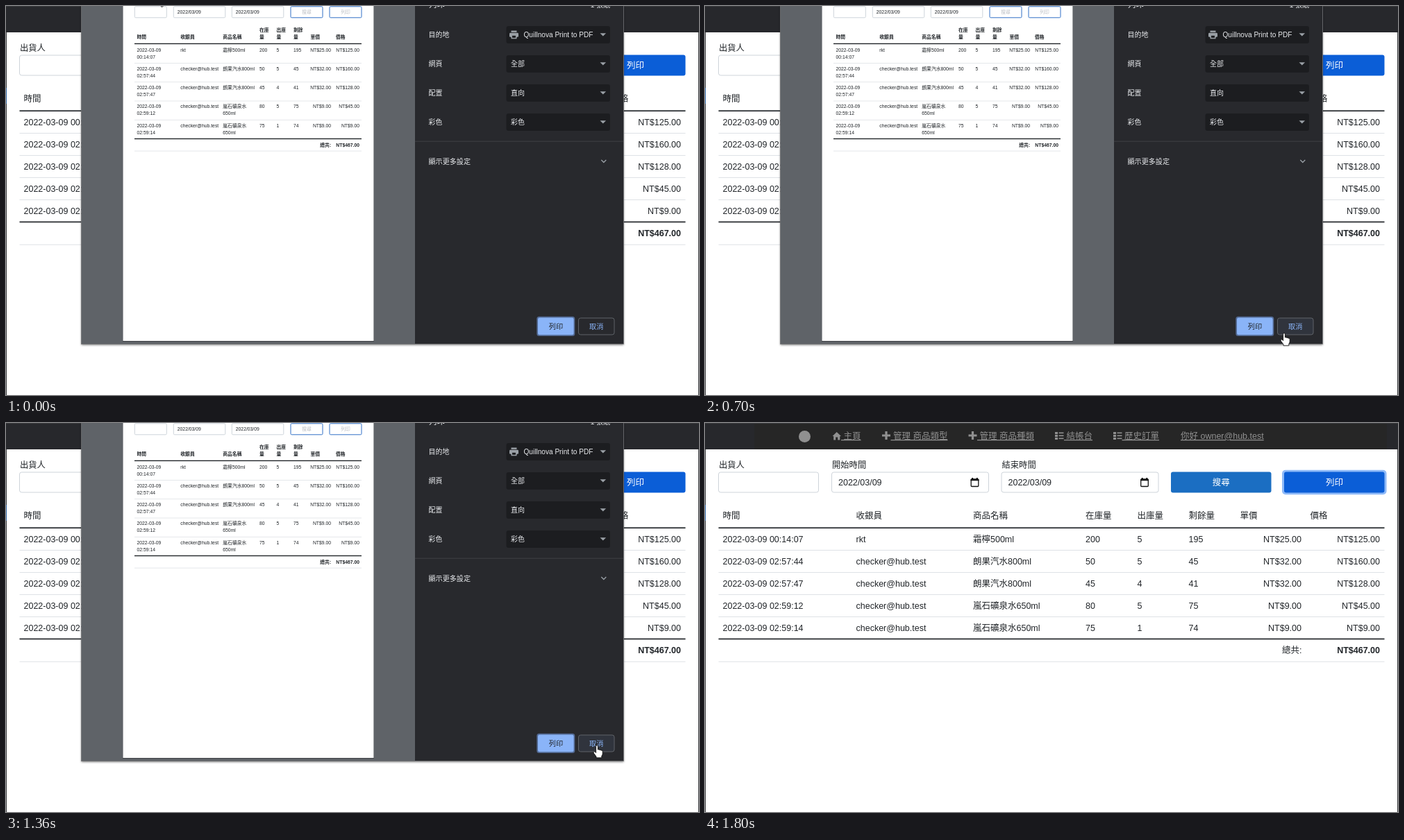
Recreate the animation shown at these times as an HTML page. Size 998 by 561 pixels, loop 2.22 s.

```html
<!DOCTYPE html>
<html lang="zh-Hant">
<head>
<meta charset="utf-8">
<title>列印</title>
<style>
html, body { margin: 0; width: 100%; height: 100%; overflow: hidden; background: #fff; }
svg { display: block; width: 100%; height: 100%; }
text { font-family: "Liberation Sans", "Noto Sans CJK TC", "Noto Sans CJK", sans-serif; white-space: pre; }
</style>
</head>
<body>
<svg id="stage" viewBox="0 0 998 561">
  <defs>
    <filter id="soft" x="-5%" y="-5%" width="110%" height="110%"><feGaussianBlur stdDeviation="1.6"/></filter>
    <clipPath id="sheet"><rect x="109" y="0" width="780" height="487"/></clipPath>
  </defs>
  <g id="page"></g>
  <g id="fade">
    <path d="M109 0H889L925.5 521H72Z" fill="#28292d" opacity=".16"/>
    <path d="M72 521.5H925.5" stroke="#000" stroke-opacity=".08"/>
  </g>
  <g id="dialog">
    <rect x="108.5" y="-6" width="781" height="495" fill="#000" opacity=".5" filter="url(#soft)"/>
    <rect x="108.5" y="-6" width="781" height="493.5" fill="#28292d" stroke="#77787b" stroke-width=".8"/>
    <g id="preview" clip-path="url(#sheet)"></g>
  </g>
  <g id="cursor">
    <path id="arrow" d="M0 0V13.2L3 10.4L5 15L7.1 14.1L5.1 9.6H9.2Z" fill="#fff" stroke="#000" stroke-width=".8"/>
    <path id="hand" d="M-1.4 1Q-1.2-.3 0-.3T1.4 1V6.1Q2.6 5.3 3.8 6.5Q5 5.9 6 7.1Q8 6.7 8.2 8.6V12Q8 14 6.8 15.2V17.8H-1V16L-4.6 11.2Q-5.4 9.4-4.2 8.8Q-3 8.5-1.4 10.6Z" fill="#fff" stroke="#000" stroke-width=".8"/>
  </g>
</svg>
<script>
const $ = id => document.getElementById(id);
const INK = '#212529', RULE = '#dee2e6';

const text = (x, y, s, size, o = {}) =>
  `<text x="${x}" y="${y}" font-size="${size}" fill="${o.fill || INK}" font-weight="${o.weight || 300}"` +
  ` text-anchor="${o.anchor || 'start'}"${o.line ? ' text-decoration="underline"' : ''}>${s}</text>`;
const box = (x, y, w, h, fill, stroke = 'none', r = 0, sw = 1) =>
  `<rect x="${x}" y="${y}" width="${w}" height="${h}" rx="${r}" fill="${fill}" stroke="${stroke}" stroke-width="${sw}"/>`;
const path = (d, fill, stroke = 'none', sw = 1) =>
  `<path d="${d}" fill="${fill}" stroke="${stroke}" stroke-width="${sw}"/>`;

const CASHIER = 'checker@hub.test', COLA = '朗果汽水', WATER = '嵐石礦泉水';
const orders = [
  ['00:14:07', 'rkt', '霜檸', '500ml', 200, 5, 25],
  ['02:57:44', CASHIER, COLA, '800ml', 50, 5, 32],
  ['02:57:47', CASHIER, COLA, '800ml', 45, 4, 32],
  ['02:59:12', CASHIER, WATER, '650ml', 80, 5, 9],
  ['02:59:14', CASHIER, WATER, '650ml', 75, 1, 9]
];
const heads = ['時間', '收銀員', '商品名稱', '在庫量', '出庫量', '剩餘量', '單價', '價格'];
const money = n => `NT$${n}.00`;
const total = orders.reduce((sum, o) => sum + o[5] * o[6], 0);

function navBar() {
  const grey = '#909090', size = 12.5;
  const label = (x, s) => text(x, 23, s, size, { fill: grey, line: true });
  const plus = x => path(`M${x} 18H${x + 12}M${x + 6} 12V24`, 'none', grey, 3.2);
  const list = x => [13, 17, 21].map(y =>
    box(x, y, 4, 3, grey) + box(x + 5.5, y + .5, 7, 1.6, grey)).join('');
  return box(0, 0, 998, 38, '#27282c') +
    `<g id="nav">${box(71, 0, 911, 38, '#262626')}</g>` +
    box(0, 0, 998, 1, '#3a3b3e') +
    `<circle cx="143.5" cy="19.5" r="8.5" fill="${grey}"/>` +
    path('M183.5 19L189.7 13L196 19H194.3V24.5H191.2V20.5H188.2V24.5H185.2V19Z', grey) +
    label(196, '\u00a0主頁') +
    plus(255) + label(267.5, '\u00a0管理 商品類型') +
    plus(379.5) + label(392, '\u00a0管理 商品種類') +
    list(504) + label(517, '\u00a0結帳台') +
    list(588) + label(600.5, '\u00a0歷史訂單') +
    label(685, '你好 owner@hub.test');
}

function filterForm() {
  const field = (x, w) => box(x, 71, w, 29, '#fff', '#ced4da', 3);
  const date = (x, s) => text(x + .5, 65, s, 12.3) + field(x, 226) +
    text(x + 9.5, 90, '2022/03/09', 12.5) +
    box(x + 200.7, 81, 10.6, 10.5, 'none', '#111', 1, 1.3) +
    path(`M${x + 200} 82.3h12M${x + 202.7} 79v3M${x + 209.3} 79v3`, 'none', '#111', 2);
  const white = { fill: '#fff', anchor: 'middle', weight: 400 };
  return text(20, 65, '出貨人', 12.3) + field(19.5, 144) +
    date(182.5, '開始時間') + date(427, '結束時間') +
    box(671, 70.5, 144.5, 30, '#1b6ec2', 'none', 3) + text(743.2, 89.5, '搜尋', 12.5, white) +
    `<g id="ring">${box(831, 67.8, 150.5, 35.5, '#8fbaf8', 'none', 5)}</g>` +
    box(834, 70.5, 144.5, 30, '#0b5ed7', 'none', 3) + text(906.5, 89.5, '列印', 12.5, white);
}

function mainTable() {
  const xs = [25.5, 217.5, 386, 548, 622.5, 696.5, 770.5, 871.5], size = 12.5;
  const end = { anchor: 'end' };
  const rule = (y, h, c) => box(19.5, y, 959, h, c);
  let s = heads.map((h, i) => text(xs[i], 138, h, size, { weight: 500 })).join('') + rule(150.4, 1.7, INK);
  orders.forEach(([time, who, item, vol, stock, out, price], i) => {
    const y = 171.5 + 32 * i;
    [`2022-03-09 ${time}`, who, item + vol, stock, out, stock - out].forEach((v, c) => s += text(xs[c], y, v, size));
    s += text(859, y, money(price), size, end) + text(972, y, money(price * out), size, end);
    s += i < 4 ? rule(183 + 32 * i, 1, RULE) : rule(310.6, 1.7, INK);
  });
  return s + text(859.5, 332, '總共:', size, { anchor: 'end', weight: 500 }) +
    text(972, 332, money(total), size, { anchor: 'end', weight: 700 }) + rule(343.7, 1, RULE);
}

function printSheet() {
  const xs = [188.5, 251.3, 312.3, 365, 389.5, 414, 438.5, 475], size = 6.8;
  const bold = { weight: 700 }, end = { anchor: 'end' }, endBold = { anchor: 'end', weight: 700 };
  const rule = (y, h, c) => box(185, y, 327, h, c);
  const field = (x, w, v = '') => box(x, .8, w, 16, '#fff', '#ced4da', 1.5) + text(x + 5.5, 11, v, size);
  const button = (x, v) => box(x, .8, 46, 16, '#fff', '#2f6fc6', 1.5) +
    text(x + 23, 11, v, size, { fill: '#b9bcc2', anchor: 'middle' });
  let s = box(109, 0, 480, 487, '#5f6368') + box(168, -4, 362, 488, '#3f4246') +
    box(168.5, -4, 361, 487, '#fff') +
    field(185.3, 46) + field(241.3, 74.5, '2022/03/09') + field(325.3, 74.5, '2022/03/09') +
    button(410, '搜尋') + button(466, '列印');
  heads.forEach((h, i) => {
    const wraps = i > 2 && i < 6;
    if (wraps) s += text(xs[i], 37, h.slice(0, 2), size, bold);
    s += text(xs[i], 47, wraps ? '量' : h, size, bold);
  });
  s += rule(53.7, 1.4, INK);
  orders.forEach(([time, who, item, vol, stock, out, price], i) => {
    const y = 65.5 + 27.3 * i, wraps = item === WATER;
    ['2022-03-09', who, wraps ? item : item + vol, stock, out, stock - out].forEach((v, c) => s += text(xs[c], y, v, size, { weight: 400 }));
    s += text(xs[0], y + 10, time, size);
    if (wraps) s += text(xs[2], y + 10, vol, size);
    s += text(468, y, money(price), size, end) + text(509, y, money(price * out), size, end);
    s += i < 4 ? rule(82 + 27.3 * i, .8, RULE) : rule(190.8, 1.4, INK);
  });
  return s + text(468, 202.5, '總共:', size, endBold) + text(509, 202.5, money(total), size, endBold) + rule(208.7, .8, RULE);
}

function printOptions() {
  const light = { fill: '#e8eaed', weight: 400 }, grey = '#9aa0a6';
  const rows = [['目的地', 'Quillnova Print to PDF'], ['網頁', '全部'], ['配置', '直向'], ['彩色', '彩色']];
  let s = text(608.5, 2, '列印', 12, light) + text(870, 2, '1 張紙', 10, { ...light, anchor: 'end' });
  rows.forEach(([name, value], i) => {
    const y = 42 * i;
    s += text(608.5, 45 + y, name, 10, light) + box(720.5, 29 + y, 149.5, 25, '#1c1d20', 'none', 3) +
      text(i ? 727 : 745.5, 44.8 + y, value, i ? 10 : 10.1, light) +
      path(`M855.5 ${39.3 + y}h8.6l-4.3 4.3Z`, grey);
  });
  s += box(727.5, 35.5, 8, 2.4, grey) + box(725, 38.8, 13, 6, grey, 'none', 1.4) +
    box(727.5, 42, 8, 5.3, grey) + box(729, 42.8, 5, 3, '#1c1d20') +
    box(589, 194.7, 300, 1, '#3f4145') + text(608.5, 227.7, '顯示更多設定', 10.1, light) +
    path('M857.3 222l3.5 3.5l3.5-3.5', 'none', grey, 1.3);
  return s + box(764.3, 447.8, 55, 28.2, '#536a94', 'none', 3.5) + box(766, 449.5, 51.6, 24.8, '#8ab4f8', 'none', 2.5) +
    text(792, 465.5, '列印', 10.2, { fill: INK, anchor: 'middle', weight: 400 }) +
    `<g id="hover">${box(824.5, 450, 51.5, 24, '#8ab4f8', 'none', 3)}</g>` +
    box(824.5, 450, 51.5, 24, 'none', '#5f6368', 3) +
    text(850.2, 465.5, '取消', 10.2, { fill: '#8ab4f8', anchor: 'middle', weight: 400 });
}

$('page').innerHTML = box(0, 0, 998, 561, '#fff') + navBar() + filterForm() + mainTable() +
  box(0, 38, 1, 523, '#3b3c40') + box(0, 118, 1, 23, '#2f66a5') + box(997, 38, 1, 523, '#3b3c40');
$('preview').innerHTML = printSheet() + printOptions();
$('hover').setAttribute('opacity', .08);

// Pointer stops: start time, x, y, shape
const LOOP = 2220, CLEARED = 1520, CLOSED = 1670, DONE = 1800;
const stops = [
  [0, 219, -13.5, 'arrow'], [120, 531, 139, 'arrow'], [270, 170, 207, 'arrow'], [400, 419, 111, 'arrow'],
  [550, 785, 437.5, 'arrow'], [700, 834, 472, 'hand'], [820, 859, 476, 'hand'], [940, 860, 474.5, 'hand'],
  [1090, 857, 472, 'hand'], [1210, 854, 468, 'hand'], [1360, 851, 465, 'hand'],
  [CLEARED, 851.3, 465, 'arrow'], [CLOSED, 896.5, 501, 'arrow'], [DONE, 0, 0, '']
];
const show = (id, on) => $(id).setAttribute('visibility', on ? 'visible' : 'hidden');

function draw(t) {
  const [, x, y, shape] = stops.filter(s => s[0] <= t).pop();
  $('cursor').setAttribute('transform', `translate(${x} ${y})`);
  show('arrow', shape === 'arrow');
  show('hand', shape === 'hand');
  show('dialog', t < CLOSED);
  show('preview', t < CLEARED);
  show('hover', shape === 'hand' && t < CLEARED && x > 824 && y < 474);
  show('nav', t >= CLOSED);
  show('ring', t >= CLOSED);
  show('fade', t >= CLOSED && t < DONE);
}

const start = performance.now();
function tick() {
  draw((performance.now() - start) % LOOP);
  requestAnimationFrame(tick);
}
tick();
</script>
</body>
</html>
```
